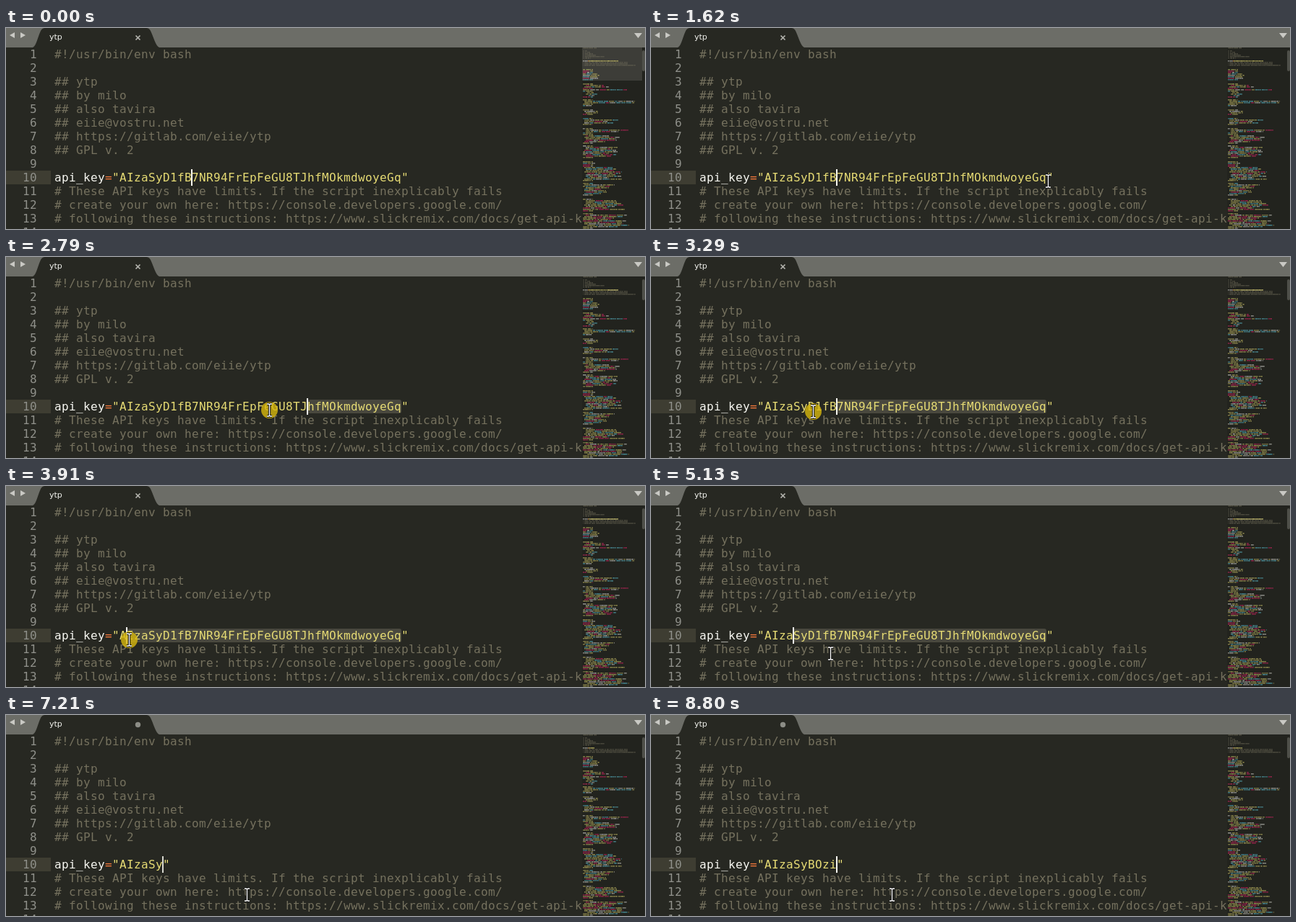
An HTML page with a canvas for the animation above (8820 ms loop, 884 px wide and 279 px high).

```html
<!DOCTYPE html>
<html lang="en">
<meta charset="utf-8">
<title>Editor</title>
<style>
html, body { margin: 0; width: 100%; height: 100%; overflow: hidden; background: #272822; }
body > * { position: absolute; margin: 0; }
pre {
  top: 27px; height: 252px; overflow: hidden; color: #75715e;
  font: 16px/19px "DejaVu Sans Mono", monospace; letter-spacing: calc(10px - 1ch);
}
#nums { left: 23px; width: 30px; color: #8f908a; }
#code { left: 67px; width: 730px; }
#code b { font-weight: normal; color: #f8f8f2; }
#code i { font-style: normal; color: #f5793b; }
#key { color: #e6db74; }
#row { left: 0; top: 198px; width: 62px; height: 19px; background: #3e3d32; }
#sel { top: 198px; height: 19px; background: #49483e; border-radius: 3px; }
#caret { top: 196px; width: 2px; height: 23px; background: #f8f8f0; }
#side { left: 797px; top: 27px; width: 87px; height: 252px; background: #22231e; }
#view { left: 797px; top: 27px; width: 83px; height: 46px; background: #3d3d38; }
#map { left: 798px; top: 27px; }
#bar { left: 880px; top: 31px; width: 4px; height: 29px; background: #4e4f49; border-radius: 2px; }
#top { left: 0; top: 0; }
#top text { font: 11px "DejaVu Sans", sans-serif; fill: #f4f4f0; }
</style>
<body>
<div id="row"></div>
<div id="sel"></div>
<pre id="nums"></pre>
<pre id="code">#!/usr/bin/env bash

## ytp
## by milo
## also tavira
## eiie@vostru.net
## https://gitlab.com/eiie/ytp
## GPL v. 2

<b>api_key</b><i>=</i><span id="key"></span>
# These API keys have limits. If the script inexplicably fails
# create your own here: https://console.developers.google.com/
# following these instructions: https://www.slickremix.com/docs/get-api-k</pre>
<div id="caret"></div>
<div id="side"></div>
<div id="view"></div>
<canvas id="map" width="82" height="252"></canvas>
<div id="bar"></div>
<svg id="top" width="884" height="279">
  <path fill="#6c6d67" d="M0 0H884V27H0Z"/>
  <path fill="#272822" d="M37 27C42 25 44 12 48 4Q50 0 54 0H194Q198 0 200 4C204 12 207 25 212 27Z"/>
  <path fill="#c9c9c4" d="M12 6V14L5 10ZM20 6V14L27 10ZM869 7H880L874.5 14Z"/>
  <text x="60" y="16">ytp</text>
  <path id="close" stroke="#b4b4ae" stroke-width="1.7" d="M179.5 10.5l6 6m0-6l-6 6"/>
  <circle id="dot" cx="182.500" cy="13.500" r="3.700" fill="#8c8d86"/>
  <g id="mouse">
    <circle id="press" r="11.500" fill="#d8b80e" opacity=".8"/>
    <g id="beam" fill="none">
      <path id="stem" stroke="#111" stroke-width="3.400" d="M-3.500-8.500H-1L0-7.500 1-8.500H3.500M0-7.500V7.500M-3.500 8.500H-1L0 7.500 1 8.500H3.500"/>
      <use href="#stem" id="core"/>
    </g>
    <path id="arrow" fill="#111" stroke="#fff" stroke-width="1.200" d="M.5-.5V15L4 11.500 7 18.500 9.500 17.500 6.500 11H11.500Z"/>
  </g>
</svg>
<script>
const $ = id => document.getElementById(id);
const LOOP = 8820, PRESS = 1990, RELEASE = 4470, CUT = 5800, LAG = 170;
const OLD = 'AIzaSyD1fB7NR94FrEpFeGU8TJhfMOkmdwoyeGq', NEW = 'AIzaSyBOzi';
const TYPED = [6140, 6560, 6640, 6760, 6870, 7030, 7670, 7860, 8140, 8720];
// time, x, y of the pointer
const PATH = [
  [100, 920, 300], [190, 828, 250], [400, 720, 236], [700, 620, 222], [920, 590, 214],
  [1250, 575, 212], [1620, 549, 212], [1990, 546, 212], [2200, 530, 212], [2500, 450, 212],
  [2790, 364, 212], [3100, 265, 213], [3400, 200, 215], [3690, 171, 215], [3910, 170, 213],
  [4300, 161, 213], [4770, 161, 213], [5000, 200, 222], [5300, 310, 244], [5500, 333, 249]
];
const clamp = v => Math.max(0, Math.min(1, v));
const show = (id, on) => $(id).style.display = on ? '' : 'none';

function pointer(t) {
  let i = 1;
  while (i < PATH.length - 1 && PATH[i][0] < t) i++;
  const [a, b] = [PATH[i - 1], PATH[i]], k = clamp((t - a[0]) / (b[0] - a[0]));
  return [a[1] + (b[1] - a[1]) * k, a[2] + (b[2] - a[2]) * k];
}

// White inner line of the text pointer
const core = $('stem').cloneNode();
core.removeAttribute('id');
core.setAttribute('stroke', '#fff');
core.setAttribute('stroke-width', 1.3);
$('core').replaceWith(core);

$('nums').textContent = Array.from({ length: 14 }, (_, i) => String(i + 1).padStart(2)).join('\n');

const map = $('map').getContext('2d');
let seed = 7;
const rnd = () => (seed = seed * 16807 % 2147483647) / 2147483647;

function mini(text, row, x, color, alpha = .55) {
  map.fillStyle = color;
  [...text].forEach((c, i) => {
    if (c === ' ') return;
    map.globalAlpha = alpha * (.6 + c.charCodeAt(0) % 7 / 15);
    map.fillRect(x + i, row * 2, 1, 1);
    map.globalAlpha *= .5;
    map.fillRect(x + i, row * 2 + 1, 1, 1);
  });
}

// Blocks of code: first row, last row, deepest indent, longest line
const BLOCKS = [
  [15, 16, 0, 50], [17, 22, 0, 25], [25, 28, 6, 42], [29, 29, 6, 70], [30, 34, 8, 24],
  [36, 39, 2, 80], [40, 40, 2, 18], [43, 46, 3, 24], [49, 53, 2, 58], [56, 59, 4, 76],
  [60, 66, 4, 56], [68, 76, 4, 54], [79, 81, 2, 24], [82, 92, 5, 55], [94, 102, 4, 44],
  [105, 113, 4, 62], [115, 125, 5, 66]
];
const HUES = ['#e6db74', '#e6db74', '#f8f8f2', '#66d9ef', '#e6db74', '#f92672'];

function drawMap() {
  $('code').textContent.split('\n').forEach((s, i) => {
    if (i !== 9) mini(s, i, 0, '#75715e');
  });
  for (const [from, to, deep, long] of BLOCKS)
    for (let row = from; row <= to; row++) {
      const edge = row === from || row === to;
      let x = edge ? 0 : 2 * Math.floor(rnd() * (deep / 2 + 1));
      const end = Math.min(82, edge && from < to ? 14 : long * (.55 + .45 * rnd()));
      while (x < end) {
        const n = Math.min(Math.ceil(2 + rnd() * 9), Math.ceil(end - x));
        const word = Array.from({ length: n }, () => String.fromCharCode(97 + rnd() * 26)).join('');
        mini(word, row, x, HUES[Math.floor(rnd() * HUES.length)]);
        x += n + 1;
      }
    }
}
drawMap();

function frame(now) {
  const t = now % LOOP, cut = t >= CUT;
  const count = TYPED.filter(v => v <= t).length;
  const [x, y] = pointer(t);
  const drag = t >= PRESS && t < RELEASE, chosen = t >= PRESS && !cut;
  let col = 19, reset = 0;
  if (chosen) {
    col = Math.max(9, Math.min(48, Math.round((pointer(t - LAG)[0] - 67) / 10)));
    reset = drag ? t : RELEASE;
  } else if (cut) {
    col = 9 + count;
    reset = count ? TYPED[count - 1] : CUT;
  }
  const text = '"' + (cut ? NEW.slice(0, count) : OLD) + '"';
  $('key').textContent = text;

  $('caret').style.left = 66 + col * 10 + 'px';
  $('caret').style.opacity = clamp(.65 + 1.3 * Math.cos((t - reset) / 800 * 2 * Math.PI));
  show('sel', chosen);
  $('sel').style.left = 67 + col * 10 + 'px';
  $('sel').style.width = (48 - col) * 10 + 'px';

  map.clearRect(0, 18, 82, 2);
  if (chosen) {
    map.globalAlpha = 1;
    map.fillStyle = '#49483e';
    map.fillRect(col, 18, 48 - col, 2);
  }
  mini('api_key', 9, 0, '#f8f8f2');
  mini('=', 9, 7, '#f5793b');
  mini(text, 9, 8, '#e6db74', .7);
  $('view').style.opacity = clamp((900 - t) / 800);

  show('close', !cut);
  show('dot', cut);
  const arrow = x > 797 || t >= 5900 && t < 6700;
  show('arrow', arrow);
  show('beam', !arrow);
  show('press', drag);
  $('mouse').setAttribute('transform', `translate(${Math.round(x) + .5} ${Math.round(y) + .5})`);
  requestAnimationFrame(() => frame(performance.now() - start));
}
const start = performance.now();
frame(0);
</script>
</body>
</html>
```
